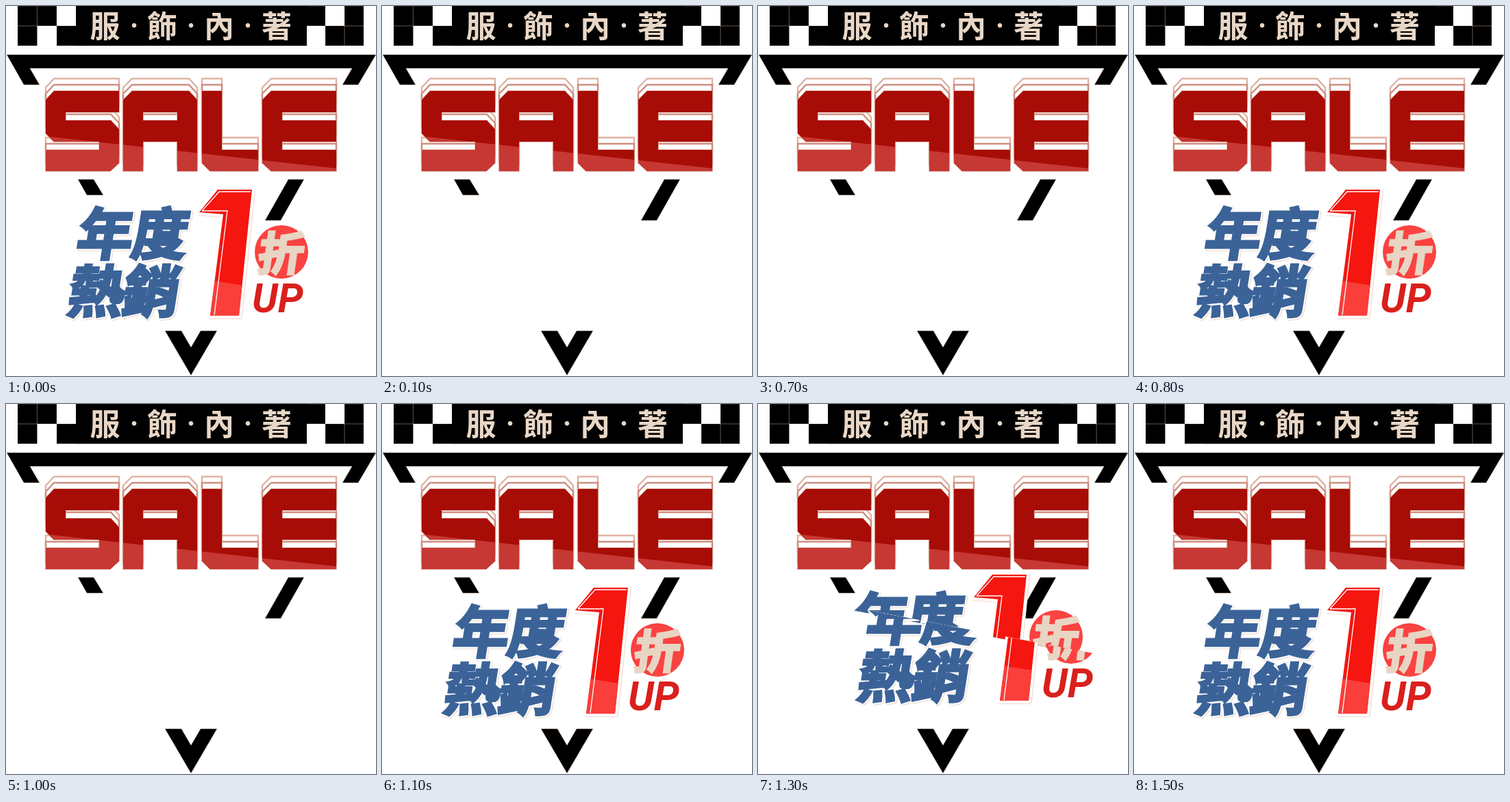
Write an HTML page that moves like this. It is 540x540 px and loops after 6500 ms.

```html
<!DOCTYPE html>
<html lang="zh-Hant">
<head>
<meta charset="utf-8">
<title>Sale</title>
<style>
  html, body { margin: 0; width: 100%; height: 100%; overflow: hidden; background: #fff; }
  svg { display: block; width: 100vw; height: 100vh; }
  text { font-family: "Noto Sans CJK TC", "Noto Sans CJK", sans-serif; font-weight: 900; }
  .banner { font-size: 44px; font-weight: 700; text-anchor: middle; fill: #e9d7c7; }
  .dots { font-size: 26px; }
  .hot { font-size: 82px; letter-spacing: -2px; }
  .unit { font-size: 67px; }
  .up { font: italic 600 59px Roboto, sans-serif; }
  .rim { stroke-linejoin: round; }
</style>
</head>
<body>
<svg viewBox="0 0 540 540">
  <defs>
    <g id="sale">
      <path d="M70 124H165V155H87V167H153L165 180V229L152 241H58V210H136V198H70L58 186V137Z"/>
      <path d="M184 124H267L279 137V241H250V198H200V241H171V137ZM200 155V167H250V155Z"/>
      <path d="M286 124H315V210H368V241H298L286 229Z"/>
      <path d="M387 124H482V155H403V167H482V198H403V210H482V241H387L374 229V137Z"/>
    </g>
    <g id="hot">
      <text class="hot" transform="translate(100 363) skewX(-9)">年度</text>
      <text class="hot" transform="translate(87 447) skewX(-9)">熱銷</text>
    </g>
    <path id="one" d="M309 268H359L340 452H298L317 304L282 301Z"/>
    <g id="shapes">
      <use href="#hot"/><use href="#one"/>
    </g>
    <clipPath id="saleShade"><path d="M57 190L482 237V242H57Z"/></clipPath>
    <clipPath id="oneShade"><path d="M290 399L360 410V460H290Z"/></clipPath>
    <clipPath id="above"><path d="M0 300L540 403V0H0Z"/></clipPath>
    <clipPath id="below"><path d="M0 300L540 403V540H0Z"/></clipPath>

    <g id="promo">
      <use class="rim" href="#shapes" x="1" y="1" fill="#eed9cc" stroke="#eed9cc" stroke-width="8"/>
      <use class="rim" href="#shapes" fill="#fff" stroke="#fff" stroke-width="8"/>
      <use href="#hot" fill="#3b6398" stroke="#3b6398" stroke-width="3.6"/>
      <use href="#one" fill="#f4160f"/>
      <use href="#one" fill="#fa3e3a" clip-path="url(#oneShade)"/>
      <path d="M286 299L311 271H357M286 299H323L304 451" fill="none" stroke="#fff" stroke-width="1.3"/>
      <circle cx="402" cy="359" r="39" fill="#fa4340"/>
      <text class="unit" transform="translate(365 386) skewX(-8)" fill="#e8d5c4" stroke="#e8d5c4" stroke-width="3">折</text>
      <text class="up" x="359" y="447" fill="#d9201c">UP</text>
    </g>
  </defs>

  <g stroke="#d9b8a2" stroke-width=".5">
    <g stroke-opacity=".5">
      <path d="M17 0H45.500V29H17ZM45.500 0H74V29H45.500ZM17 29H45.500V58H17ZM74 29H102.500V58H74Z"/>
      <path d="M438 0H466V29H438ZM494 0H522V29H494ZM466 29H494V58H466ZM494 29H522V58H494Z"/>
    </g>
    <path d="M1 71H540L514 115H491L505 91H35L49 115H26Z"/>
    <path d="M105 253H128L142 276H118ZM412 253H435L401 313H378ZM232 474H256L270 498L284 474H308L270 539Z"/>
  </g>
  <path d="M102 0H439V58H102Z"/>
  <text class="banner" x="144.500 228 311 395" y="46">服飾內著</text>
  <text class="banner dots" x="187 270 353" y="38">···</text>

  <use href="#sale" y="-18" fill="none" stroke="#dfb3a4" stroke-width="2.4"/>
  <use href="#sale" y="-9" fill="none" stroke="#cd8f80" stroke-width="2.4"/>
  <use href="#sale" fill="none" stroke="#d9a797" stroke-width="1.6"/>
  <use href="#sale" fill="#a80c07"/>
  <use href="#sale" fill="#c63834" clip-path="url(#saleShade)"/>

  <use id="whole" href="#promo"/>
  <g id="split">
    <use href="#promo" clip-path="url(#above)"/>
    <g transform="translate(22)"><use href="#promo" clip-path="url(#below)"/></g>
  </g>
</svg>
<script>
  const LOOP = 6500;
  const whole = document.getElementById('whole');
  const split = document.getElementById('split');

  // Each cue: start time, then 'show', 'hide' or the [x, y] shift of the split state.
  const cues = [
    [0, 'show'], [100, 'hide'], [200, 'show'], [700, 'hide'], [800, 'show'],
    [1000, 'hide'], [1100, 'show'], [1200, [-30, 13]], [1300, [33, -19]],
    [1400, 'hide'], [1500, 'show']
  ];

  function draw() {
    const t = performance.now() % LOOP;
    const state = cues.findLast(([start]) => start <= t)[1];
    const isSplit = Array.isArray(state);
    whole.style.display = state === 'show' ? '' : 'none';
    split.style.display = isSplit ? '' : 'none';
    if (isSplit) split.setAttribute('transform', `translate(${state})`);
    requestAnimationFrame(draw);
  }
  draw();
</script>
</body>
</html>
```
